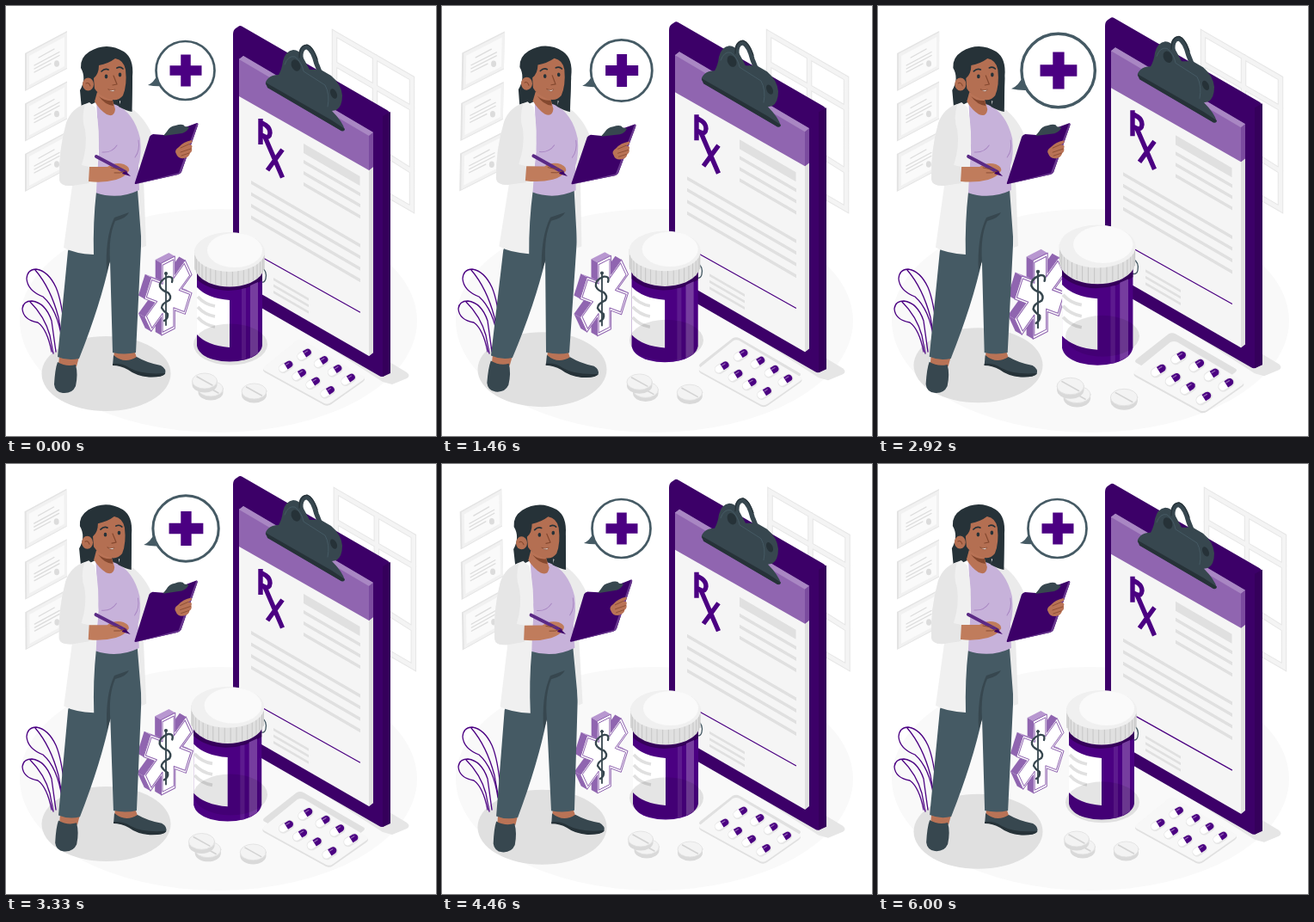
An HTML page that plays this animation: 500 by 500 pixels, repeating every 6040 ms.

```html
<!DOCTYPE html>
<html lang="en">
<head>
<meta charset="utf-8">
<title>Prescription</title>
<style>
html, body { margin: 0; width: 100%; height: 100%; overflow: hidden; background: #fff; }
svg { display: block; width: 100vw; height: 100vh; }
</style>
</head>
<body>
<svg viewBox="0 0 500 500" fill="none" stroke-linecap="round" stroke-linejoin="round">
  <ellipse cx="247" cy="366" rx="231" ry="130" fill="#f9f9f9"/>

  <g id="shadows" fill="#e0e0e0">
    <ellipse cx="116.5" cy="427.5" rx="75" ry="43.5"/>
    <path d="M264 325L446 414L466 426Q471 430 466 433L449 440L438 437Z" fill="#e6e6e6"/>
    <path d="M301 420L338 391Q342 389 346 391L415 431Q419 433 415 436L378 463Q374 465 370 463L301 425Q297 423 301 420Z"/>
  </g>

  <g id="certs"></g>
  <g id="window"></g>

  <g stroke="#4b0082" stroke-width="1.3">
    <path d="M65 388Q60 353 43 338Q25 331 24 317Q25 306 35 306Q49 308 58 327Q65 343 68 378"/>
    <path d="M34 307Q52 328 61 362L66 390"/>
    <path d="M53 402Q48 376 37 368Q20 365 19 352Q20 343 30 343Q46 345 53 366L58 402"/>
    <path d="M28 344Q45 361 51 383L55 404"/>
  </g>

  <g id="board">
    <path d="M264 33Q264 28 267 26L270 24Q272 22 275 24L443 121Q447 123 447 128V426L440 430Q437 432 434 430L264 332Z" fill="#3c0068"/>
    <path d="M438 128L447 123V427L438 431Z" fill="#35005b"/>
    <path d="M271 62L276 59L427 149V403L422 407L271 320Z" fill="#f5f5f5"/>
    <path d="M422 152L427 149V403L422 407Z" fill="#e0e0e0"/>
    <path d="M271 62L276 58L427 147V187L422 191L271 105Z" fill="#9065b0"/>
    <path d="M271 62L276 58L427 147L422 151Z" fill="#a987c3"/>
    <path d="M422 151L427 147V187L422 191Z" fill="#7b4c9f"/>
    <g stroke="#4b0082" stroke-width="5.400" stroke-linecap="butt" stroke-linejoin="miter">
      <path d="M296 131V161M296 135L302 138.500Q307 142 307 147.500Q306.500 154 301 152L296 149.500"/>
      <path d="M301 152L321.500 199.500M321.500 167L304 191"/>
    </g>
    <g id="text" fill="#e0e0e0"></g>
    <path d="M299 293L411.500 356" stroke="#4b0082" stroke-width="1.2"/>
    <path d="M297 304Q304 308 302 317Q301 322 296 321" stroke="#455a64" stroke-width="1.3"/>
    <path d="M302 91Q301 88 305 84Q309 80 317 80Q321 73 322 64Q325 52 334 51Q341 51 345 59L353 74L366 74L378 81Q390 91 391 104Q391 117 384 121L379 122Q391 134 394 144Q392 147 388 144L305 95Z" fill="#37474f"/>
    <path d="M302 89L379 133L394 143Q392 147 388 144L304 95Z" fill="#263238"/>
    <path d="M343.500 66Q340.500 48 350 47.500Q357 51 361 67L365 77" stroke="#37474f" stroke-width="5.500"/>
    <path d="M341 60Q341 46 350 45Q357 47 362 62" stroke="#263238" stroke-width="1.200"/>
    <path d="M324 68Q328 57 336 59Q344 65 346 76L371 92Q377 103 374 117" stroke="#455a64" stroke-width="1"/>
    <ellipse cx="337" cy="69" rx="5" ry="7" fill="#263238" transform="rotate(-25 337 69)"/>
    <ellipse cx="381" cy="102" rx="3.500" ry="6" fill="#263238" transform="rotate(-25 381 102)"/>
  </g>

  <g id="star">
    <g id="arms"></g>
    <g stroke="#37474f" transform="translate(1 0)">
      <path d="M185 311V371" stroke-width="1.800"/>
      <path d="M192 321Q194 314 187 315Q177 319 178 326Q180 331 187 333Q192 337 189 342Q180 346 180 351Q182 355 187 358Q188 363 183 366" stroke-width="2.300"/>
      <circle cx="185" cy="311" r="1.500" fill="#37474f"/>
    </g>
  </g>

  <g id="meds">
    <path d="M222 300H298V395Q296 406 279 411Q260 416 241 411Q224 406 222 395Z" fill="#4b0082"/>
    <path d="M222 303H298V319Q280 331 258 331Q235 330 222 318Z" fill="#35005a"/>
    <path d="M274 329L279 328V411L274 412Z" fill="#5d1a8f"/>
    <path d="M284 325L293 321V404L284 409Z" fill="#763d9f"/>
    <path d="M222 327Q234 340 260 342V397Q234 395 222 382Z" fill="#fff"/>
    <path d="M223 338Q231 347 243 349M223 350Q231 359 243 361M223 362Q231 371 243 373" stroke="#e0e0e0" stroke-width="3.500" stroke-linecap="butt"/>
    <path d="M219 284V304Q221 315 236 322Q260 331 284 322Q299 315 300.500 304V284Z" fill="#e0e0e0"/>
    <g id="ridges" stroke="#c7c7c7" stroke-width="1"></g>
    <ellipse cx="260" cy="286" rx="41" ry="23" fill="#f0f0f0"/>
    <ellipse cx="266" cy="284" rx="32" ry="20" fill="#fafafa"/>
    <g id="tablets"></g>
    <path d="M301 420L338 390Q342 388 346 390L415 431Q419 434 415 437L378 463Q374 466 370 464L301 426Q297 423 301 420Z" fill="#e0e0e0"/>
    <path d="M301 419L338 389Q342 387 346 389L415 430Q419 432 415 435L378 461Q374 464 370 462L301 424Q297 422 301 419Z" fill="#f7f7f7"/>
    <g id="pills"></g>
  </g>
  <ellipse id="tint" cx="261" cy="393.5" rx="43" ry="24" fill="#000" fill-opacity=".1"/>

  <g id="bubble">
    <path d="M165 92Q172 89 176 80L184 93Q174 94 165 92Z" fill="#455a64"/>
    <circle cx="208.500" cy="75" r="34" fill="#fff" stroke="#455a64" stroke-width="2.700"/>
  </g>
  <path id="cross" d="M203.250 56.500H214.750V69.250H227.500V80.750H214.750V93.500H203.250V80.750H190.500V69.250H203.250Z" fill="#4b0082"/>

  <g id="doctor">
    <path d="M97 53Q117 41 137 53Q149 61 147 82L146 122L128 120L104 112L88 120L86 98Q94 84 87 72Q86 60 97 53Z" fill="#263238"/>
    <path d="M62 407L85 408L82 419Q70 423 61 418Z" fill="#b97356"/>
    <path d="M126 400H149L152 409Q140 417 125 411Z" fill="#b97356"/>
    <path d="M60 414Q70 420 81 417Q84 428 81 442Q77 451 66 450Q57 449 56 440Q57 422 60 414Z" fill="#37474f"/>
    <path d="M125 406Q138 417 152 408Q164 415 180 418Q187 422 185 428Q180 432 165 431Q151 429 142 422Q133 417 124 418Z" fill="#37474f"/>
    <path d="M124 416Q135 415 144 421Q158 429 185 427Q183 432 166 431.500Q151 430 142 423Q133 418 124 418Z" fill="#263238"/>
    <path d="M104 212L155 212Q159 255 156 300L151 403Q138 406 124 403L121 296Q110 347 85 410Q72 413 60 408L72 285Z" fill="#455a64"/>
    <path d="M143 240Q140 247 127 250Q119 268 121 297L117 309Q115 269 126 246Z" fill="#37474f"/>
    <path d="M132 110L146 119Q163 131 172 155L160 202L163 279L158 281L153 214L156 160L132 124Z" fill="#ebebeb"/>
    <path d="M105 108L128 115Q149 124 156 154Q158 172 154 186L155 214Q130 226 104 217L108 170Z" fill="#c7b2da"/>
    <path d="M112 170Q123 171 129 162M150 176Q156 168 154 156" stroke="#a987c3"/>
    <path d="M106 100L123 106L127 120Q126 130 117 126Q109 121 103 111Z" fill="#b97356"/>
    <path d="M108 105Q115 111 124 110L125 116Q115 115 108 105Z" fill="#84482f"/>
    <path d="M134 70Q146 68 147 84L146.500 123Q140 122 131 117Q138 100 139 80Z" fill="#263238"/>
    <path d="M102 84Q108 79 108 69Q119 67 127 61Q137 63 139 74Q141 92 136 104Q130 112 119 108Q107 103 103 96Z" fill="#b46f52"/>
    <ellipse cx="95.500" cy="91" rx="6.500" ry="7.500" fill="#b46f52"/>
    <path d="M93 90Q96 88 98 93" stroke="#84482f"/>
    <g fill="#263238">
      <ellipse cx="116.500" cy="82" rx="1.800" ry="2.400"/>
      <ellipse cx="132.500" cy="80" rx="1.800" ry="2.400"/>
    </g>
    <path d="M111 76Q115 72 119 74M129 72Q133 70 136 73" stroke="#263238" stroke-width="1.700"/>
    <path d="M125 81L129 91L124 92" stroke="#84482f" stroke-width="1.200"/>
    <path d="M119 97Q123 99 127 97Q125 102 119 97Z" fill="#fff" stroke="#84482f" stroke-width=".7"/>
    <path d="M97 112L104 118Q110 145 107 175L105 216Q101 252 102 289Q80 288 67 281L77 209Q63 210 62 202Q61 168 70 136Q76 119 97 112Z" fill="#f0f0f0"/>
    <path d="M92 114Q76 119 70 136Q61 168 62 202Q63 210 77 209L97 206V187L88 185Q95 163 92 144Q87 131 92 114Z" fill="#e6e6e6"/>
    <path d="M184 150L222 136Q224 136 223 139L204 193Q203 195 200 196L151 207Q149 207 150 205L167 152Q168 150 171 149Z" fill="#3c0068"/>
    <path d="M222 136Q224 136 223 139L204 193Q203 195 200 196L151 207L201 194Z" fill="#6a3a90"/>
    <path d="M183 151L187 146Q190 140 197 139Q206 136 208 140L213 141Q211 146 205 148Z" fill="#37474f"/>
    <path d="M216 156Q218 159 212 161Q218 161 216 165Q217 169 214 171Q213 176 207 177Q200 178 198 172Q195 168 201 164Q206 158 216 156Z" fill="#b97356"/>
    <path d="M212 161L203 165M215 166L203 170M213 171L204 174" stroke="#84482f" stroke-width=".8"/>
    <path d="M97 187L118 187Q127 181 137 184Q146 188 142 193Q138 199 128 202Q113 206 96 204Z" fill="#c07c5c"/>
    <path d="M105 175L139 193" stroke="#5b2a86" stroke-width="4"/>
    <path d="M138 191L145 198L135 195Z" fill="#3c0068"/>
    <path d="M122 188Q128 190 133 189M126 194Q133 195 139 192" stroke="#84482f" stroke-width=".9"/>
  </g>
</svg>

<script>
const $ = id => document.getElementById(id);
const fill = (id, parts) => { $(id).innerHTML = parts.join(''); };
const LOOP = 6040;
const SLOPE = 0.58;

// Flat bar lying in the slanted plane of the board
const bar = (x1, x2, y, h) => {
  const y2 = y + (x2 - x1) * SLOPE;
  return `<path d="M${x1} ${y}L${x2} ${y2}V${y2 + h}L${x1} ${y + h}Z"/>`;
};

fill('text', [
  bar(346, 411.5, 160, 11),
  ...[179, 192, 205].map(y => bar(346, 412, y, 4)),
  ...[203, 216.5, 230, 243.5].map(y => bar(285, 412, y, 4)),
  ...[316, 323.5, 331].map(y => bar(311, 352, y, 3))
]);

fill('certs', [0, 58.5, 117].map(y => `
  <g transform="translate(0 ${y})">
    <path d="M22 55L71 29V73L22 99Z" fill="#e3e3e3"/>
    <path d="M24 55.500L71 30.500V72L24 97Z" fill="#f1f1f1"/>
    <path d="M27 58L68 36V70L27 92Z" fill="#fafafa"/>
    <path d="M38 60L56 50M33 69L62 53.500M33 73L62 57.500M33 77L52 67" stroke="#dcdcdc" stroke-width="1.300"/>
    <ellipse cx="59" cy="67" rx="3" ry="3.800" fill="#dcdcdc"/>
  </g>`));

const panes = 'M382 32L472 84V236L382 184ZM429 59V211M382 67L472 119M382 135L472 192';
fill('window', [[6.5, '#e6e6e6'], [4.5, '#f4f4f4']].map(([w, c]) =>
  `<path d="${panes}" stroke="${c}" stroke-width="${w}" stroke-linejoin="miter"/>`));

// Six-armed emblem: built flat, sheared into place, then given depth
const polar = (r, a) => [r * Math.sin(a), -r * Math.cos(a)];
const shear = ([x, y]) => [188.5 + 0.65 * x, 337 - 0.33 * x + y];
const starPoints = (len, half) => {
  const points = [];
  const end = Math.hypot(len, half), d = Math.atan2(half, len);
  for (let k = 0; k < 6; k++) {
    const a = k * Math.PI / 3;
    points.push(polar(end, a - d), polar(end, a + d), polar(half * 2, a + Math.PI / 6));
  }
  return points.map(shear);
};
const outline = points => 'M' + points.map(p => p.map(v => v.toFixed(2)).join(' ')).join('L') + 'Z';
const [depthX, depthY] = [-7, -4];
const front = starPoints(42, 12);
const sides = front.map(([x, y], i) => {
  const [u, v] = front[(i + 1) % front.length];
  const facing = (u - x) * depthY - (v - y) * depthX < 0;
  const shade = Math.abs(u - x) > Math.abs(v - y) ? '#b897d0' : '#9065b0';
  const quad = outline([[x, y], [u, v], [u + depthX, v + depthY], [x + depthX, y + depthY]]);
  return facing ? `<path d="${quad}" fill="${shade}"/>` : '';
});
fill('arms', [
  ...sides,
  `<path d="${outline(front)}" fill="#fff" stroke="#9065b0" stroke-width="1"/>`,
  `<path d="${outline(starPoints(39, 9.8))}" stroke="#9065b0" stroke-width="1"/>`
]);

const ridges = [];
for (let i = 1; i < 19; i++) {
  const a = Math.PI * i / 19, x = 260 - 40.5 * Math.cos(a), dy = 22 * Math.sin(a);
  ridges.push(`<path d="M${x} ${287 + dy}V${303 + dy}"/>`);
}
fill('ridges', ridges);

fill('tablets', [[238, 445], [231, 436], [288.5, 448]].map(([x, y]) => `
  <g transform="translate(${x} ${y})">
    <path d="M-14.500 0V4A14.500 9.500 0 0 0 14.500 4V0Z" fill="#d9d9d9"/>
    <ellipse rx="14.500" ry="9" fill="#f3f3f3" stroke="#e0e0e0" stroke-width=".8"/>
    <path d="M-9 -5L9 5" stroke="#d3d3d3" stroke-width="1.500"/>
  </g>`));

const spots = [[347, 405], [366.5, 413.5], [382.5, 423.5], [398, 434], [325.5, 419], [341, 428.5], [357, 438], [374, 448.5]];
fill('pills', spots.map(([x, y]) => `
  <g transform="translate(${x} ${y}) rotate(-32)">
    <rect x="-9.500" y="-5" width="19" height="11" rx="5.500" fill="#e6e6e6"/>
    <rect x="-8.500" y="-4" width="17" height="8" rx="4" fill="#fff"/>
    <path d="M0 -4H4.500A4 4 0 0 1 4.500 4H0Z" fill="#4b0082"/>
    <path d="M1 -1.500H5" stroke="#9065b0" stroke-width="1.200"/>
  </g>`));

// Double heartbeat: time, strength
const beat = [[0, 0], [690, 1], [1760, 0], [2850, 1], [3780, 0], [LOOP, 0]];
const pulse = t => {
  const i = beat.findIndex(k => k[0] > t);
  const [t0, v0] = beat[i - 1], [t1, v1] = beat[i];
  return v0 + (v1 - v0) * (1 - Math.cos(Math.PI * (t - t0) / (t1 - t0))) / 2;
};

const shake = t => {
  const n = (t - 1360) / 1250;
  return n > 0 && n < 2.5 ? -4 * Math.sin(2 * Math.PI * n) : 0;
};

const move = (id, value) => $(id).setAttribute('transform', value);
const grow = (id, s, x, y) =>
  move(id, `translate(${x} ${y}) scale(${s}) translate(${-x} ${-y})`);

function draw(now) {
  const t = now % LOOP;
  const lift = -10 * (1 - Math.abs(2 * t / LOOP - 1));
  const tilt = 1.1 * Math.sin(2 * Math.PI * t / LOOP);
  const p = pulse(t);

  for (const id of ['shadows', 'tint', 'board']) move(id, `translate(0 ${lift})`);
  move('doctor', `rotate(${tilt} 139 248)`);
  move('certs', `rotate(${tilt} 47 123)`);
  move('window', `translate(${shake(t)} 0)`);
  grow('star', 1 + 0.09 * p, 186, 335);
  grow('meds', 1 + 0.085 * p, 317, 364);
  grow('bubble', 1 + 0.26 * p, 204, 75);
  grow('cross', 1 + 0.16 * p, 203, 75);
}

const start = performance.now();
function tick() {
  draw(performance.now() - start);
  requestAnimationFrame(tick);
}
tick();
</script>
</body>
</html>
```
